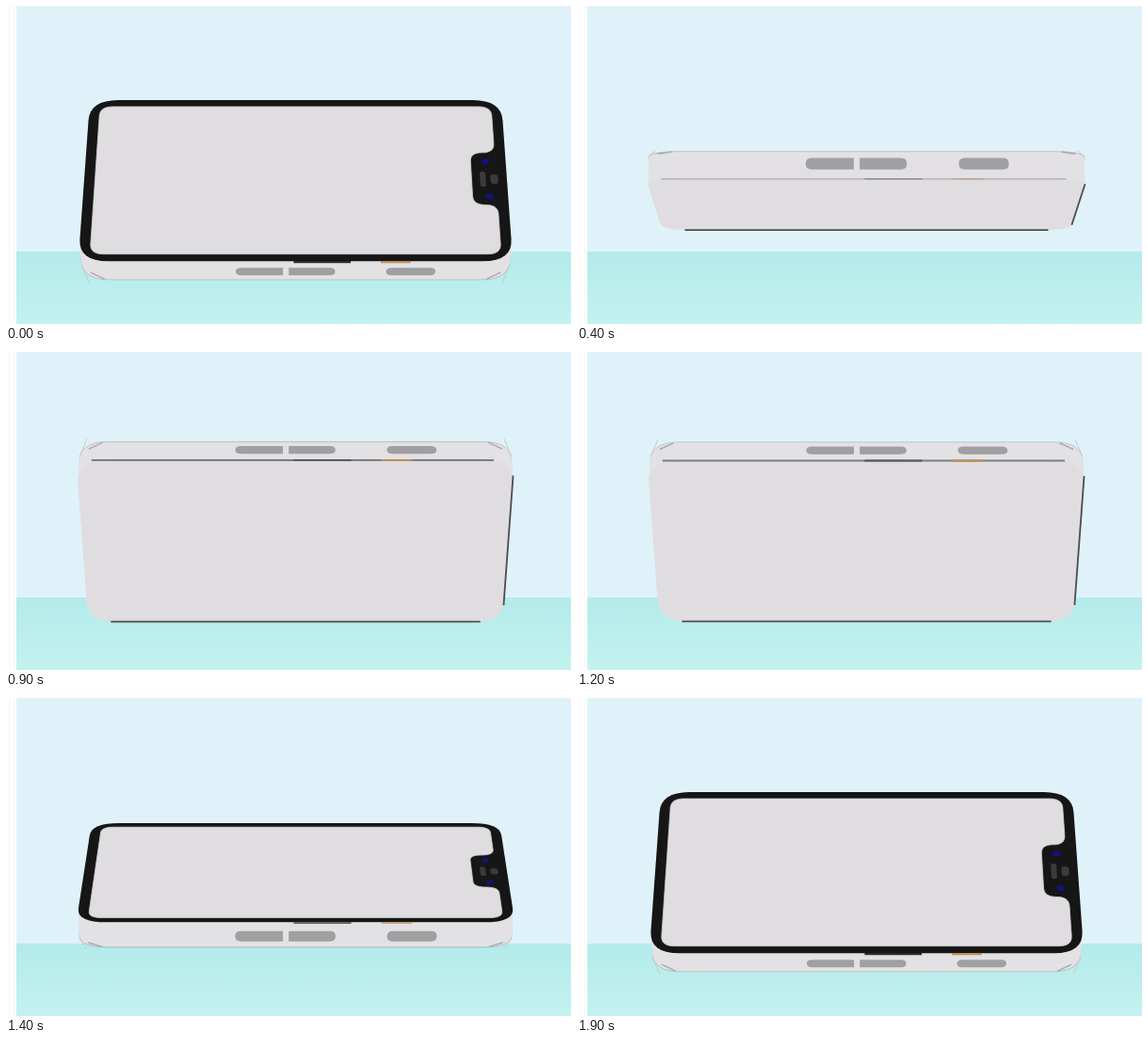
Animation of 600x338 px, one loop 2000 ms. Source, as an HTML page with a canvas:

```html
<!DOCTYPE html>
<html>
<head>
<meta charset="utf-8">
<title>Turning phone</title>
<style>
  html, body { margin: 0; width: 100%; height: 100%; overflow: hidden; background: #dff2fa; }
  canvas { display: block; width: 600px; height: 338px; }
</style>
</head>
<body>
<canvas id="stage" width="600" height="338"></canvas>
<script>
const ctx = document.getElementById('stage').getContext('2d');
const LOOP = 2000, STEP = 100, TURN = 300, TILT = 47;
const HALF_W = 224.5, HALF_H = 117, FRONT = -2, BACK = -31, FOCAL = 2900;

let sin = 0, cos = 1;

// x runs along the phone, v across its face, n along the face normal.
function project(x, v, n) {
  const scale = FOCAL / (FOCAL - (v * cos + n * sin));
  return [307.5 + x * scale, 182 + (v * sin - n * cos) * scale];
}

// Turns corners [x, y, radius] into a smooth closed outline.
function rounded(corners) {
  const points = [];
  const toward = (a, b, r) => {
    const k = r / Math.hypot(b[0] - a[0], b[1] - a[1]);
    return [a[0] + (b[0] - a[0]) * k, a[1] + (b[1] - a[1]) * k];
  };
  corners.forEach((c, i) => {
    const a = toward(c, corners.at(i - 1), c[2]);
    const b = toward(c, corners[(i + 1) % corners.length], c[2]);
    for (let s = 0; s <= 1; s += 1 / 8) {
      const q = 1 - s;
      points.push([0, 1].map(d => q * q * a[d] + 2 * q * s * c[d] + s * s * b[d]));
    }
  });
  return points;
}

const box = (x0, y0, x1, y1, left, right = left) =>
  rounded([[x0, y0, left], [x1, y0, right], [x1, y1, right], [x0, y1, left]]);

const body = box(-HALF_W, -HALF_H, HALF_W, HALF_H, 31);
const screen = rounded([
  [-213, -107, 14], [213, -107, 14], [213, -38, 13], [187, -38, 13],
  [187, 38, 13], [213, 38, 13], [213, 107, 14], [-213, 107, 14]
]);
const buttons = [
  box(-62, -6, -13, 6, 6, 0),
  box(-7, -6, 41, 6, 0, 6),
  box(94, -6, 145, 6, 6)
];
const lenses = [
  [203, -25, 4, 4, '#12127c'], [205, 26, 4, 4, '#12127c'],
  [199, 1, 3, 11, '#3b3b3d'], [211, 1, 4, 7, '#3b3b3d']
];

function trace(points) {
  ctx.beginPath();
  points.forEach(p => ctx.lineTo(...p));
}

function fill(points, color) {
  trace(points);
  ctx.closePath();
  ctx.fillStyle = color;
  ctx.fill();
}

function line(points, color, width) {
  trace(points);
  ctx.strokeStyle = color;
  ctx.lineWidth = width;
  ctx.stroke();
}

const onFace = (points, n) => points.map(([x, v]) => project(x, v, n));

function drawRoom() {
  ctx.fillStyle = '#dff2fa';
  ctx.fillRect(0, 0, 600, 338);
  const floor = ctx.createLinearGradient(0, 261, 0, 338);
  floor.addColorStop(0, '#b3ebea');
  floor.addColorStop(1, '#c3f2f0');
  ctx.fillStyle = floor;
  ctx.fillRect(0, 261, 600, 77);
  ctx.fillStyle = '#fff';
  ctx.fillRect(0, 0, 11, 338);
  ctx.fillStyle = '#f5f6f7';
  ctx.fillRect(3, 0, 1, 338);
  ctx.fillRect(8, 0, 1, 338);
}

function drawSide(near, far) {
  const outer = onFace(body, far);
  fill(outer, '#e3e1e4');
  line([...outer, outer[0]], 'rgba(140,140,145,.5)', 0.9);
  for (let i = 1; i <= 30; i++) {
    fill(onFace(body, far + (near - far) * i / 30), '#e3e1e4');
  }
  for (const side of [-1, 1]) {
    line([project(side * 214, 107, far), project(side * 199, 116, far)], '#a9abad', 1.5);
    line([project(side * 224, 97, far), project(side * 215, 121, far)], '#c6cacd', 1);
  }
  // Buttons sit slightly off centre, away from the visible face.
  const middle = near * 0.44 + far * 0.56;
  for (const button of buttons) {
    fill(button.map(([x, n]) => project(x, HALF_H, middle + n)), '#a09fa1');
  }
}

function drawFront() {
  fill(onFace(body, FRONT), '#161617');
  const glass = onFace(screen, FRONT);
  fill(glass, '#e0dde1');
  line([...glass, glass[0]], '#d2d0d3', 0.8);
  for (const [x, v, rx, rv, color] of lenses) {
    fill(onFace(box(x - rx, v - rv, x + rx, v + rv, Math.min(rx, rv)), FRONT), color);
  }
}

function drawBack() {
  fill(onFace(body, BACK), '#e0dde1');
  const edge = (...ends) => line(onFace(ends, BACK), '#4c4d4f', 1.8);
  edge([HALF_W - 0.5, 96], [HALF_W - 0.5, -92]);
  edge([-200, -HALF_H], [200, -HALF_H]);
}

function drawSeam(n, frontView) {
  const open = Math.abs(sin);
  const drop = frontView ? 0.8 : -0.2;
  const seam = (x0, x1, color, width) => {
    const ends = [x0, x1].map(x => project(x, HALF_H, n));
    line(ends.map(([x, y]) => [x, y + drop]), color, width * open);
  };
  if (!frontView) seam(-209, 203, '#7d7d80', 2.8);
  seam(-2, 57, frontView ? '#2b2b2d' : '#59595c', 2.8);
  seam(88, 119, '#c08f55', 3);
}

function ease(time, start) {
  const x = Math.min(1, Math.max(0, (time - start) / TURN));
  return x * x * (3 - 2 * x);
}

function draw(time) {
  const turn = ease(time, 220) - ease(time, 1190);
  const angle = (TILT - 2 * TILT * turn) * Math.PI / 180;
  sin = Math.sin(angle);
  cos = Math.cos(angle);
  const frontView = sin > 0;
  const [near, far] = frontView ? [FRONT, BACK] : [BACK, FRONT];

  drawRoom();
  drawSide(near, far);
  frontView ? drawFront() : drawBack();
  drawSeam(near, frontView);
}

function tick() {
  draw(Math.floor(performance.now() % LOOP / STEP) * STEP);
  requestAnimationFrame(tick);
}
tick();
</script>
</body>
</html>
```
